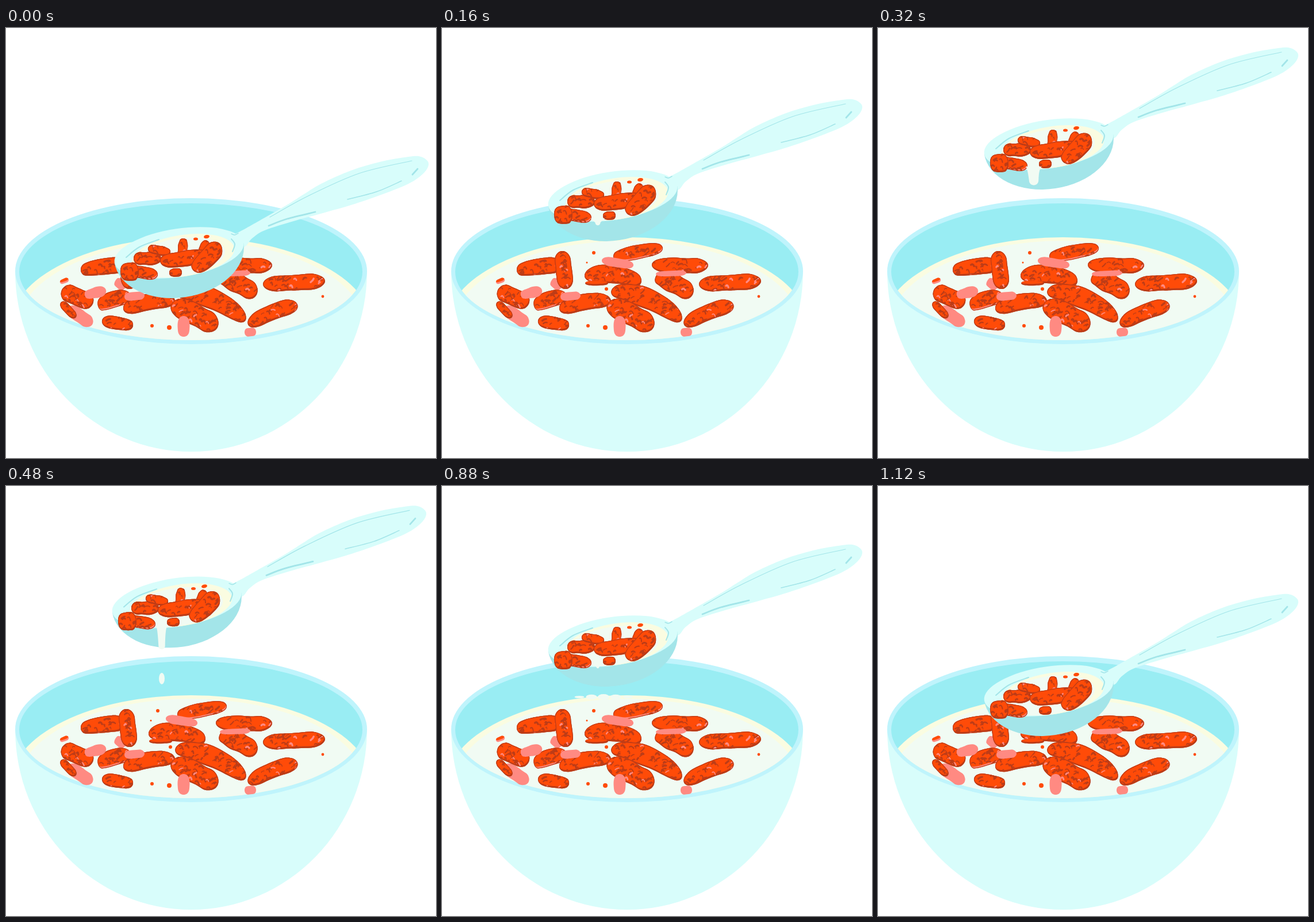
Recreate the animation shown at these times as an HTML page with a canvas. Size 748 px wide and 748 px high, loop 1.2 s.

```html
<!DOCTYPE html>
<html>
<head>
<meta charset="utf-8">
<style>
html, body { margin: 0; width: 100%; height: 100%; overflow: hidden; background: #fff; }
canvas { display: block; width: 100vmin; height: 100vmin; }
</style>
</head>
<body>
<canvas id="stage" width="748" height="748"></canvas>
<script>
const ctx = document.getElementById('stage').getContext('2d');
const STEP = 80, STEPS = 15, TAU = Math.PI * 2;
const C = {
  body: '#d8fdfb', rim: '#bff4fc', inside: '#99edf3', milk: '#f1fbf3', cream: '#fafce1',
  under: '#a3e5e9', red: '#ff4b08', dark: '#bd3c17', pink: '#ff8a82'
};

// Smooth curve through [x, y] points
function curve(p, closed = true) {
  const n = p.length, path = new Path2D();
  const at = i => closed ? p[(i + n) % n] : p[Math.max(0, Math.min(n - 1, i))];
  path.moveTo(...p[0]);
  for (let i = 0; i < (closed ? n : n - 1); i++) {
    const [a, b, c, d] = [at(i - 1), at(i), at(i + 1), at(i + 2)];
    path.bezierCurveTo(b[0] + (c[0] - a[0]) / 6, b[1] + (c[1] - a[1]) / 6,
      c[0] - (d[0] - b[0]) / 6, c[1] - (d[1] - b[1]) / 6, c[0], c[1]);
  }
  return path;
}

function fill(path, color) {
  ctx.fillStyle = color;
  ctx.fill(path);
}

function line(path, width, color = C.under) {
  ctx.strokeStyle = color;
  ctx.lineWidth = width;
  ctx.lineCap = 'round';
  ctx.stroke(path);
}

function oval(x, y, rx, ry, color, turn = 0, end = TAU) {
  ctx.beginPath();
  ctx.ellipse(x, y, rx, ry, turn, 0, end);
  ctx.fillStyle = color;
  ctx.fill();
}

function random(seed) {
  return () => (seed = (seed * 16807) % 2147483647) / 2147483647;
}

// Lumpy rounded stick: two ends, sideways bend, half width
function stick([x0, y0, x1, y1, bend, r], rnd) {
  const len = Math.hypot(x1 - x0, y1 - y0), nx = (y0 - y1) / len, ny = (x1 - x0) / len;
  const n = 7, upper = [], lower = [];
  const at = t => {
    const b = 2 * t * (1 - t) * bend;
    return [x0 + (x1 - x0) * t + nx * b, y0 + (y1 - y0) * t + ny * b];
  };
  for (let k = 0; k <= n; k++) {
    const t = (1 - Math.cos(Math.PI * k / n)) / 2, [x, y] = at(t);
    const w = r * Math.sqrt(1 - Math.abs(2 * t - 1) ** 4) * (0.94 + rnd() * 0.16);
    upper.push([x - nx * w, y - ny * w]);
    if (k > 0 && k < n) lower.unshift([x + nx * w, y + ny * w]);
  }
  return { path: curve(upper.concat(lower)), at, r };
}

// Red piece: shaded lower edge plus short brush flecks
function piece(shape, seed) {
  const rnd = random(seed * 7919 + 31), { path, at, r } = stick(shape, rnd);
  const len = Math.hypot(shape[2] - shape[0], shape[3] - shape[1]);
  fill(path, rnd() < 0.2 ? C.pink : C.dark);
  ctx.save();
  ctx.clip(path);
  ctx.translate(-1, -3);
  fill(path, C.red);
  ctx.translate(1, 3);
  if (r > 5) {
    for (let i = 0; i < len * r / 40; i++) {
      const [cx, cy] = at(rnd());
      const x = cx + (rnd() - 0.5) * 10, y = cy + (rnd() * 1.9 - 0.85) * r;
      const a = rnd() * 2 - 1, l = 3 + rnd() * 6, mark = new Path2D();
      mark.moveTo(x, y);
      mark.quadraticCurveTo(x + l / 2, y - 3, x + l * Math.cos(a), y + l * Math.sin(a));
      line(mark, 1.2 + rnd() * 2.4, rnd() < 0.1 ? C.pink : C.dark);
    }
    line(path, 2.5, C.dark);
  }
  ctx.restore();
}

const floating = [
  [130, 422, 210, 412, -4, 14], [208, 388, 216, 454, 0, 14], [94, 443, 109, 437, 0, 4],
  [97, 456, 151, 480, 0, 15], [96, 477, 121, 504, 0, 7], [160, 484, 218, 467, -8, 14],
  [204, 489, 294, 474, -10, 14], [167, 509, 221, 518, 0, 11], [298, 399, 384, 382, -2, 12],
  [248, 430, 347, 441, -14, 15], [249, 444, 289, 444, 0, 4], [295, 456, 417, 508, -22, 17],
  [288, 480, 368, 521, -4, 18], [365, 412, 463, 413, 2, 13], [372, 432, 436, 464, -6, 16],
  [447, 446, 555, 440, 0, 14], [421, 516, 507, 481, -8, 14]
];
const flakes = [
  [190, 440, 209, 450, 0, 9], [108, 487, 150, 516, 0, 11], [137, 465, 174, 456, 0, 9],
  [206, 468, 241, 465, 0, 7], [278, 404, 333, 413, 0, 8], [309, 501, 309, 537, 0, 10],
  [372, 428, 425, 426, 0, 5], [415, 530, 435, 528, 0, 7]
];
const crumbs = [[264, 391, 3], [252, 408, 1.5], [551, 467, 2.4], [286, 454, 3], [254, 518, 3], [284, 521, 4]];
const scooped = [
  [218, 212, 266, 212, 0, 11], [243, 194, 282, 202, 0, 8], [335, 202, 346, 181, 0, 7],
  [302, 210, 305, 177, 0, 8], [264, 217, 346, 204, 4, 13], [322, 233, 368, 186, 4, 15],
  [203, 231, 260, 241, 0, 10], [195, 236, 227, 234, 0, 15], [280, 237, 302, 236, 0, 7]
];

function drawBowl() {
  oval(322, 423, 306, 314, C.body, 0, Math.PI);
  oval(322, 423, 306, 127, C.rim);
  oval(321.5, 424, 298.5, 119, C.inside);
  ctx.save();
  ctx.beginPath();
  ctx.ellipse(321.5, 424, 298.5, 119, 0, 0, TAU);
  ctx.clip();
  oval(322, 520, 315, 156, C.cream);
  oval(322, 522, 303, 152, C.milk);
  ctx.restore();
  const flake = (f, i) => fill(stick(f, random(i + 90)).path, C.pink);
  flakes.slice(0, 2).forEach(flake);
  floating.forEach((f, i) => piece(f, i + 1));
  flakes.slice(2).forEach(flake);
  crumbs.forEach(([x, y, r]) => oval(x, y, r, r, C.red));
}

const handle = curve([
  [380, 172], [397, 168], [446, 141], [486, 118], [516, 99], [546, 81], [596, 59], [646, 44], [696, 35],
  [718, 35], [731, 46], [723, 63], [696, 82], [646, 102], [596, 119], [536, 136], [496, 147], [446, 163],
  [424, 177], [408, 192]
]);
const strokes = [
  [[[205, 210], [228, 192], [262, 179]], 2],
  [[[388, 178], [394, 187], [390, 200]], 2],
  [[[388, 169], [394, 171], [400, 168]], 1.5],
  [[[455, 140], [520, 104], [610, 64], [702, 42]], 1.2],
  [[[453, 155], [485, 143], [534, 131]], 2.8],
  [[[590, 109], [640, 96], [684, 77]], 1.5],
  [[[703, 66], [712, 56]], 2.8]
].map(([p, w]) => [curve(p, false), w]);

// Key poses, blended linearly: [step, value]
function pose(keys, step) {
  const i = keys.findIndex(k => k[0] >= step);
  if (i < 0) return keys[keys.length - 1][1];
  if (i === 0) return keys[0][1];
  const [a, u] = keys[i - 1], [b, v] = keys[i];
  return u + (v - u) * (step - a) / (b - a);
}
const drop = [[0, 189], [2, 90], [4, 0], [9, 1], [11, 68], [12, 105], [14, 154]];
const dripLength = [[0, 0], [2, 9], [4, 29], [5, 44], [9, 25], [11, 5], [13, 0]];
const dripWidth = [[0, 8], [4, 11], [9, 2.5], [11, 7]];

function drawDrip(len, w) {
  if (!len) return;
  const x = 271, y = 244, end = y + len, r = Math.min(w * 0.75, len / 2);
  const p = new Path2D();
  p.moveTo(x - w - 3, y - 3);
  p.quadraticCurveTo(x - w, y, x - r, end - r);
  p.bezierCurveTo(x - r, end + r * 0.4, x + r, end + r * 0.4, x + r, end - r);
  p.quadraticCurveTo(x + w * 0.8, y, x + w + 3, y - 3);
  fill(p, C.milk);
}

function drawSpoon(step) {
  const tilt = -0.15;
  ctx.save();
  ctx.translate(step ? 0 : 4, pose(drop, step));
  fill(handle, C.body);
  oval(297, 202, 113.5, 78, C.under, tilt, Math.PI);
  oval(297, 202, 113.5, 42, C.body, tilt);
  oval(304, 207, 90, 36, C.cream, tilt);
  oval(298, 210, 80, 33, C.milk, tilt);
  strokes.forEach(([p, w]) => line(p, w));
  scooped.forEach((f, i) => piece(f, i + 40));
  oval(326, 178, 4, 2.5, C.red);
  oval(345, 174, 5, 3, C.red, -0.2);
  drawDrip(pose(dripLength, step), pose(dripWidth, step));
  ctx.restore();
}

function drawSplash(step) {
  if (step === 6 || step === 7) oval(271, 335 + (step - 6) * 28, 5, 10, C.milk);
  const size = 1 - Math.abs(step - 9) * 0.35;
  if (size <= 0 || step < 8) return;
  const spread = 17 + Math.max(0, step - 9) * 2, fall = Math.max(0, step - 9) * 8;
  for (let i = -2; i <= 2; i++) {
    oval(281 + i * spread, 367, 9 + 4 * size * Math.cos(i), size * (6 + 11 * Math.cos(i * 0.75)), C.milk);
  }
  if (step > 10) return;
  oval(217, 364 + fall, 6.5, 5, C.milk, -0.6);
  oval(338, 351 + fall, 7, 4.5, C.milk);
  oval(332, 398, 7, 5, C.milk);
  oval(264, 391, 5, 4, C.milk);
  oval(307, 392, 6, 4, C.milk, -0.6);
}

let start, shown = -1;
function frame(now) {
  start ??= now;
  const step = Math.floor((now - start) / STEP) % STEPS;
  if (step !== shown) {
    shown = step;
    ctx.fillStyle = '#fff';
    ctx.fillRect(0, 0, 748, 748);
    drawBowl();
    drawSplash(step);
    drawSpoon(step);
  }
  requestAnimationFrame(frame);
}
requestAnimationFrame(frame);
</script>
</body>
</html>
```
